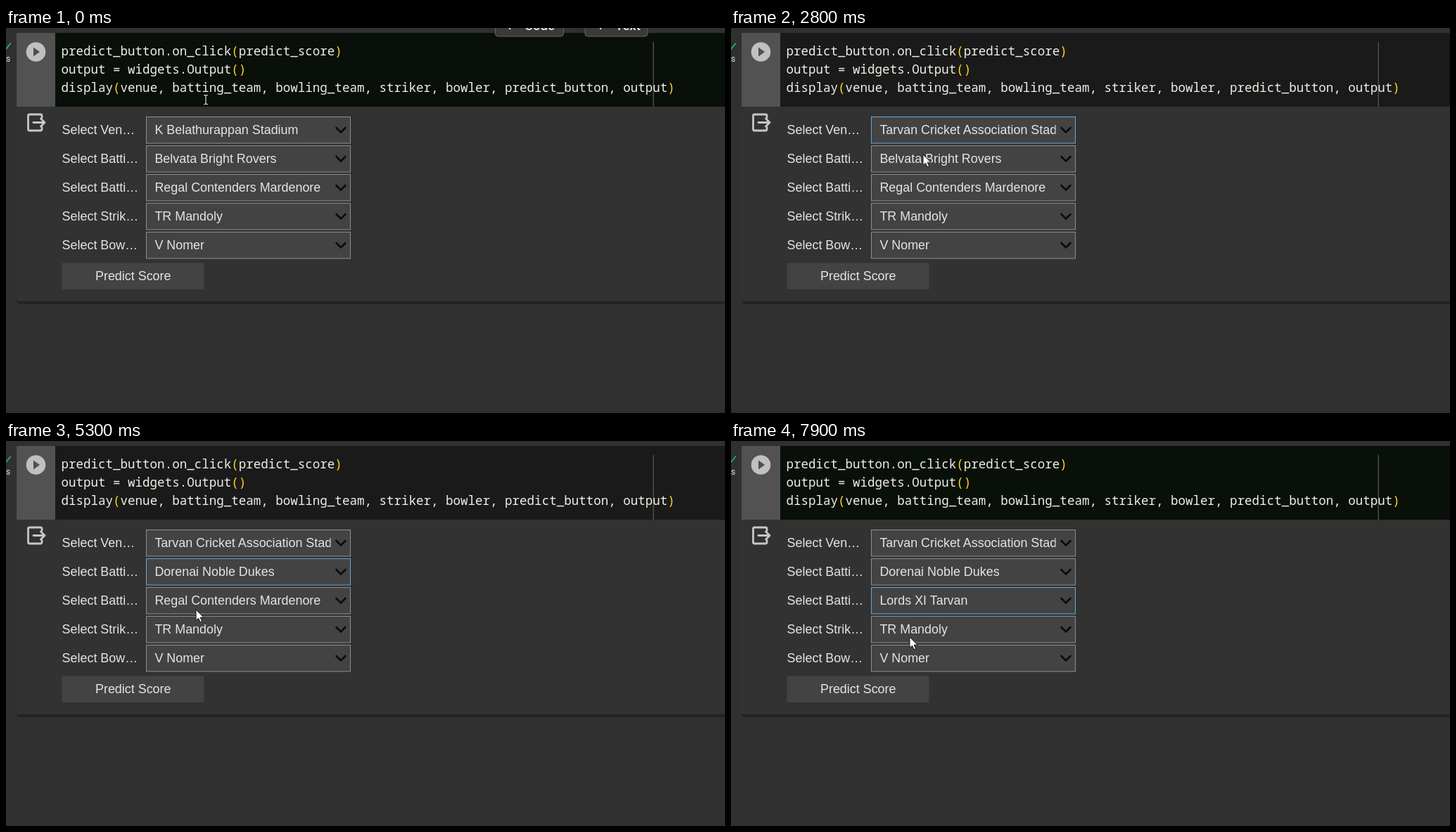
Recreate the animation shown at these times as an HTML page. Size 1022 px wide and 548 px high, loop 8000 ms.

```html
<!DOCTYPE html>
<html lang="en">
<head>
<meta charset="utf-8">
<title>Score predictor form</title>
<style>
  html, body { margin: 0; width: 100%; height: 100%; overflow: hidden; background: #303030; }
  svg { display: block; width: 1022px; height: 548px; }
  text { font: 17.92px "Liberation Sans", Arial, sans-serif; fill: #e4e4e4; white-space: pre; }
  .code text { font: 17.53px "Noto Sans Mono", monospace; fill: #efefe6; }
  .code tspan { fill: #ffd81a; }
  .list text { font-size: 17.6px; }
  .bar text { font: 500 18.5px Roboto, sans-serif; fill: #e8e8e8; }
  .bar rect { fill: #3a3a3a; stroke: #636363; }
  .box { fill: #434343; stroke: #8e8e8e; }
  .box.focus { stroke: #64a8dc; }
  .line { fill: none; stroke-linecap: round; stroke-linejoin: round; }
</style>
</head>
<body>
<svg id="stage" viewBox="0 0 1022 548" xmlns="http://www.w3.org/2000/svg">
  <defs>
    <clipPath id="valueClip"><rect x="205" y="120" width="256.5" height="220"/></clipPath>
    <filter id="soft" x="-20%" y="-20%" width="140%" height="140%"><feGaussianBlur stdDeviation="4"/></filter>
  </defs>
  <rect width="1022" height="548" fill="#303030"/>
  <path d="M15 380v7q0 6 6 6H1022V380z" fill="#232323"/>
  <path d="M15 7H1022V389H19q-4 0-4-4z" fill="#323232"/>
  <rect id="cell" x="70" y="7" width="952" height="105" fill="#1a1a1a"/>
  <rect x="15" y="7" width="55" height="105" fill="#525252"/>
  <rect x="919.5" y="20" width="1.5" height="92" fill="#4c4c4c"/>
  <circle cx="42.5" cy="34" r="13.8" fill="#c0c0c0"/>
  <path d="M39 27.5v13l9-6.5z" fill="#505050"/>
  <path class="line" d="M-3 27l3 3 6.500-8" stroke="#17c964" stroke-width="1.6"/>
  <text x="0" y="48" style="font:12px Roboto,sans-serif">s</text>
  <g class="line" stroke="#c6c6c6" stroke-width="2.8">
    <path d="M51 127.500v-2.500q0-2-2-2H33.500q-2 0-2 2v19q0 2 2 2H49q2 0 2-2V141.500"/>
    <path d="M39 134.500H55M49.500 129l5.500 5.500-5.500 5.500"/>
  </g>
  <g class="code" id="code"></g>
  <g class="bar" id="bar">
    <rect x="695.5" y="-12" width="97" height="24" rx="4"/>
    <rect x="823" y="-12" width="89" height="24" rx="4"/>
    <text x="711" y="3">+</text><text x="737" y="3">Code</text>
    <text x="840" y="3">+</text><text x="866" y="3">Text</text>
  </g>
  <g id="form"></g>
  <g id="lists"></g>
  <circle id="press" r="27" fill="#efd23e" opacity=".78"/>
  <path id="arrow" d="M0 0V15.500L3.600 12.200 6 17.700 8.600 16.600 6.200 11.200H11z" fill="#fff" stroke="#111"/>
  <path id="beam" d="M-3-6.500H-1L0-5.500 1-6.500H3M0-5.500V5.500M-3 6.500H-1L0 5.500 1 6.500H3" fill="none" stroke="#ddd" stroke-width="1.2"/>
</svg>
<script>
const $ = id => document.getElementById(id);
const add = (parent, tag, attrs, text) => {
  const el = document.createElementNS('http://www.w3.org/2000/svg', tag);
  for (const k in attrs) el.setAttribute(k, attrs[k]);
  if (text) el.textContent = text;
  parent.append(el);
  return el;
};
const show = (el, on) => el.setAttribute('visibility', on ? 'visible' : 'hidden');

const venues = ['K Belathurappan Stadium', 'Tarvan Cricket Association Stadium, Velkoti',
  'Darim Wali Bagdi', 'Mortakude Stadium', 'Bena Gardens', 'Bavan Tejpandh Stadium',
  'Tejan Varodi International Stadium, Nelpa', 'TK Velamburanan Stadium, Morbedu',
  'Dr RB Sarit Sports Academy', 'Elmreeds', "St Derwan's Park", 'Earlsholme',
  'GrandField Park', 'Badger Park', 'New Sojourners Stadium', 'Du Moras Emerald Oval',
  'LOTbonance Oval', 'Tolverdine Stadium'];
const batting = ['Belvata Bright Rovers', 'Dorenai Noble Dukes', 'Varastand Barons',
  'Norba Islanders', 'Mavorn Breakers', 'Lords XI Tarvan', 'Regal Contenders Mardenore',
  'Telvi Firebrands', 'Mavri Hunters Belora', 'Vuna Fighters', 'Dawnsters Velunagar',
  'Soaring Vuna Megatitans', 'Balorat Bears', 'Soaring Vuna Megatitan'];
const bowling = [6, 5, 7, 0, 2, 3, 1, 4, 9, 8, 10, 11, 12, 13].map(i => batting[i]);

['predict_button.on_click(predict_score)', 'output = widgets.Output()',
 'display(venue, batting_team, bowling_team, striker, bowler, predict_button, output)'
].forEach((line, i) => {
  const row = add($('code'), 'text', { x: 78.5, y: 39 + i * 26 });
  row.innerHTML = line.replace(/[()]/g, '<tspan>$&</tspan>');
});

// Form rows
const fields = ['Select Ven…', 'Select Batti…', 'Select Batti…', 'Select Strik…', 'Select Bow…'].map((label, i) => {
  const y = 126.5 + i * 41, form = $('form');
  add(form, 'text', { x: 79.6, y: y + 24.8 }, label);
  const box = add(form, 'rect', { class: 'box', x: 199.5, y, width: 290, height: 37.5 });
  const value = add(form, 'text', { x: 211.4, y: y + 24.8, 'clip-path': 'url(#valueClip)' },
    [venues, batting, bowling, ['TR Mandoly'], ['V Nomer']][i][0]);
  add(form, 'path', { class: 'line', d: `M469.500 ${y + 15.5}l6.500 6.500 6.500-6.500`, stroke: '#0c0c0c', 'stroke-width': 2.6 });
  return { box, value };
});
add($('form'), 'rect', { x: 79.5, y: 334.5, width: 202, height: 37.5, fill: '#434343' });
add($('form'), 'text', { x: 127, y: 359 }, 'Predict Score');

// Dropdown lists
const ROW = 21.94;
const lists = [
  { items: venues, top: 165, right: 670, bottom: 570, open: 1000, close: 2000 },
  { items: batting, top: 207, right: 489, bottom: 515, open: 3100, close: 4800 },
  { items: bowling, top: 248, right: 489, bottom: 556, open: 6000, close: 7500 }
];
lists.forEach((l, i) => {
  const g = l.group = add($('lists'), 'g', { class: 'list' });
  const frame = { x: 199.5, y: l.top - 0.5, width: l.right - 199.5, height: l.bottom - l.top + 0.5, rx: 7 };
  add(g, 'rect', { ...frame, y: l.top + 5, fill: '#1c1c1c', opacity: 0.4, filter: 'url(#soft)' });
  add(g, 'rect', { ...frame, fill: '#434343' });
  add(g, 'rect', { x: 199.5, y: l.top - 0.5, width: 12, height: 12, fill: '#434343' });
  l.mark = add(g, 'rect', { x: 200.5, width: (i ? 488.5 : 652) - 200.5, height: 22, fill: '#106ae6' });
  l.items.forEach((name, n) => add(g, 'text', { x: 211.4, y: l.top + 16 + n * ROW }, name));
  if (!i) {
    add(g, 'path', { d: 'M652 165H664q6 0 6 6V548H652z', fill: '#faf7fc' });
    add(g, 'rect', { x: 653.5, y: 184, width: 15, height: 230, fill: '#c9d1cc' });
    add(g, 'path', { d: 'M656.500 178h9l-4.500-5z', fill: '#8a8a8a' });
  }
});

// Pointer track: time, x, y
const track = [[0, 284, 102], [700, 284, 146], [1000, 284, 146], [1300, 281.5, 201],
  [1900, 281.5, 201], [2300, 279, 198], [2400, 279, 198], [2800, 273, 180], [3200, 273, 180],
  [4100, 272, 242], [4700, 272, 242], [5100, 271, 241], [5200, 271, 241], [5300, 270, 240],
  [5700, 256, 228], [6100, 256, 228], [6800, 253, 268], [7000, 254, 279], [8000, 254, 279]];
const pointer = t => {
  const i = track.findIndex(k => k[0] > t), a = track[i - 1], b = track[i];
  const p = (t - a[0]) / (b[0] - a[0]);
  return [a[1] + (b[1] - a[1]) * p, a[2] + (b[2] - a[2]) * p];
};
const presses = [1000, 1800, 3100, 4600, 6000, 7300];

function draw() {
  const t = Math.floor(performance.now() % 8000 / 100) * 100;
  const [x, y] = pointer(t), at = `translate(${x} ${y})`;
  for (const id of ['press', 'arrow', 'beam']) $(id).setAttribute('transform', at);
  const inCode = y < 112;
  show($('beam'), inCode);
  show($('arrow'), !inCode);
  show($('press'), presses.some(p => t >= p && t < p + 200));
  $('cell').setAttribute('fill', t < 100 || t >= 7900 ? '#090f09' : '#1a1a1a');
  $('bar').setAttribute('opacity', Math.max(0, 1 - t / 400));

  lists.forEach((l, i) => {
    show(l.group, t >= l.open && t < l.close);
    const row = Math.max(0, Math.floor((y - l.top) / ROW));
    l.mark.setAttribute('y', Math.round(l.top + row * ROW));
    fields[i].value.textContent = l.items[t >= l.close ? 1 : 0];
  });
  const focus = lists.filter(l => t >= l.open).length - 1;
  fields.forEach((f, i) => f.box.classList.toggle('focus', i === focus));
  requestAnimationFrame(draw);
}
draw();
</script>
</body>
</html>
```
